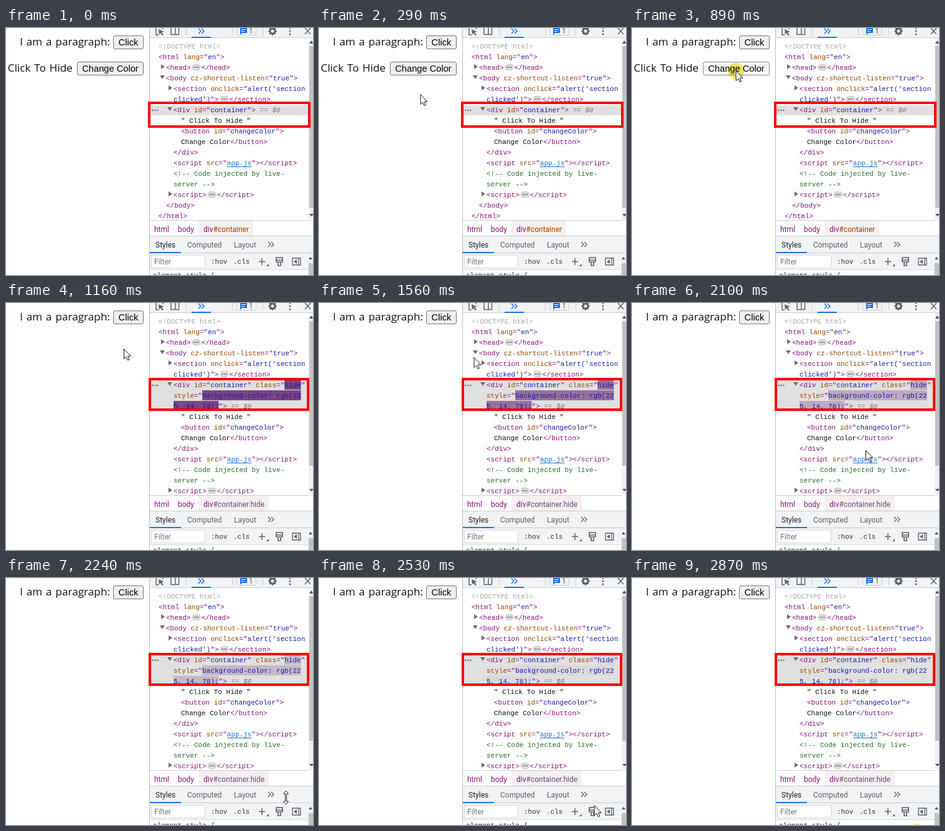
An HTML page with a canvas that plays this animation: 493 px wide and 396 px high, repeating every 2940 ms.

```html
<!DOCTYPE html>
<html lang="en">
<head>
<meta charset="utf-8">
<title>Hide and recolor demo</title>
<style>
  html, body { margin: 0; width: 100%; height: 100%; overflow: hidden; background: #fff; }
  canvas { display: block; width: 493px; height: 396px; }
</style>
</head>
<body>
<canvas id="stage"></canvas>
<script>
const W = 493, H = 396, LOOP = 2940, HIDE_AT = 1030, FADE_END = 2600;
const canvas = document.getElementById('stage');
const ratio = window.devicePixelRatio || 1;
canvas.width = W * ratio;
canvas.height = H * ratio;
const ctx = canvas.getContext('2d');
ctx.scale(ratio, ratio);

const MONO = '11px "Liberation Mono", monospace';
const UI = '12px Roboto, sans-serif';
const PAGE = '17.2px "Open Sans", sans-serif';
const BUTTON = '14.67px "Liberation Sans", Arial, sans-serif';
const ICON = '#5f6368', BLUE = '#1a73e8';

// Each piece of a line starts with a style key:
// t tag, n attribute, v value, h changed value, u link, x text, c comment, d doctype, i hint, b fold badge
const INK = { t: '#881280', n: '#994500', v: '#1a1aa6', h: '#1a1aa6', u: '#1a6fc4',
  x: '#111', c: '#236e25', d: '#a8a8a8', i: '#777' };

const HEAD_LINES = [
  [245, 'd<!DOCTYPE html>'],
  [245, 't<html |nlang|t="|ven|t">'],
  [257, 't<head>|b|t</head>', 'right'],
  [257, 't<body |ncz-shortcut-listen|t="|vtrue|t">', 'down'],
  [269, "t<section |nonclick|t=\"|valert('section", 'right'],
  [269, "vclicked')|t\">|b|t</section>"]
];
const DIV_BEFORE = [[269, 't<div |nid|t="|vcontainer|t">|i == $0', 'down']];
const DIV_AFTER = [
  [269, 't<div |nid|t="|vcontainer|t" |nclass|t="|hhide|t"', 'down'],
  [269, 'nstyle|t="|hbackground-color: rgb(22'],
  [269, 'h5, 14, 78);|t">|i == $0']
];
const TAIL_LINES = [
  [281, 'x" Click To Hide "'],
  [281, 't<button |nid|t="|vchangeColor|t">'],
  [281, 'xChange Color|t</button>'],
  [269, 't</div>'],
  [269, 't<script |nsrc|t="|uapp.js|t"><\/script>'],
  [269, 'c<!-- Code injected by live-'],
  [269, 'cserver -->'],
  [269, 't<script>|b|t<\/script>', 'right'],
  [257, 't</body>'],
  [245, 't</html>']
];

// Pointer keys: time, x, y of the tip
const POINTER = [
  [70, -6, 318], [140, 50, 255], [210, 112, 172], [290, 163, 106], [360, 163, 106],
  [560, 167, 68], [1030, 167, 68], [1490, 246, 86], [1560, 249, 87], [1630, 249, 87],
  [1830, 333, 173], [1900, 333, 173], [2030, 348, 182], [2100, 375, 235],
  [2240, 449, 352], [2310, 449, 352], [2600, 440, 368], [2670, 455, 400]
];

function rect(x, y, w, h, color) {
  ctx.fillStyle = color;
  ctx.fillRect(x, y, w, h);
}

function box(x, y, w, h, radius, fill, stroke) {
  ctx.beginPath();
  ctx.roundRect(x + .5, y + .5, w - 1, h - 1, radius);
  if (fill) { ctx.fillStyle = fill; ctx.fill(); }
  if (stroke) { ctx.strokeStyle = stroke; ctx.lineWidth = 1; ctx.stroke(); }
}

function disc(x, y, r, color) {
  ctx.fillStyle = color;
  ctx.beginPath();
  ctx.arc(x, y, r, 0, 7);
  ctx.fill();
}

function text(str, x, y, font, color, align = 'left') {
  ctx.font = font;
  ctx.fillStyle = color;
  ctx.textAlign = align;
  ctx.fillText(str, x, y);
}

function poly(points, fill, x = 0, y = 0, stroke) {
  ctx.beginPath();
  points.forEach(([px, py]) => ctx.lineTo(x + px, y + py));
  ctx.closePath();
  ctx.fillStyle = fill;
  ctx.fill();
  if (stroke) { ctx.strokeStyle = stroke; ctx.lineWidth = 1; ctx.stroke(); }
}

function strokePath(d, color = ICON, width = 1.5) {
  ctx.strokeStyle = color;
  ctx.lineWidth = width;
  ctx.stroke(new Path2D(d));
}

function codeLine([x, pieces, arrow], y, highlight) {
  if (arrow === 'down') poly([[-10, -8], [-2, -8], [-6, -2]], '#6e6e6e', x, y);
  if (arrow === 'right') poly([[-8, -9], [-2, -5], [-8, -1]], '#6e6e6e', x, y);
  for (const piece of pieces.split('|')) {
    const key = piece[0], str = piece.slice(1);
    if (key === 'b') {
      box(x + 2, y - 9, 14, 10, 4, '#dcdcdc', '#c8c8c8');
      for (let i = 0; i < 3; i++) disc(x + 6 + i * 3, y - 4, .9, '#555');
      x += 17;
      continue;
    }
    const font = key === 'i' ? 'italic ' + MONO : MONO;
    ctx.font = font;
    const width = ctx.measureText(str).width;
    if (key === 'h') rect(x, y - 12, width, 16, `rgba(95,25,105,${highlight})`);
    text(str, x, y, font, INK[key]);
    if (key === 'u') rect(x, y + 2, width, 1, INK.u);
    x += width;
  }
}

function button(label, x, y, w, pressed) {
  box(x, y, w, 22, 2.5, pressed ? '#f5f5f5' : '#efefef', pressed ? '#8d8d8d' : '#767676');
  text(label, x + w / 2, y + 16, BUTTON, '#000', 'center');
}

function page(t, hidden) {
  rect(0, 0, W, H, '#fff');
  ctx.wordSpacing = '1.3px';
  text('I am a paragraph:', 167, 28, PAGE, '#111', 'right');
  if (!hidden) text('Click To Hide', 107, 70, PAGE, '#111', 'right');
  ctx.wordSpacing = '0px';
  button('Click', 172, 12, 49);
  if (!hidden) button('Change Color', 114, 54, 107, t >= 890);
}

function toolbar() {
  rect(231, 0, 262, 15, '#f1f3f4');
  rect(231, 15, 262, 1, '#cacdd1');
  strokePath('M241 0V11H245M252 0V2');
  poly([[245, 2], [254, 6], [250, 7], [253, 11], [251, 12], [248, 8], [246, 11]], ICON);
  strokePath('M265 0V10.5H277.5V0M272 0V10');
  rect(289, 0, 1, 12, '#cacdd1');
  strokePath('M309 1L313 5L309 9M314 1L318 5L314 9', BLUE);
  rect(298, 14, 31, 2, BLUE);
  rect(363, 0, 1, 12, '#cacdd1');
  box(370, -4, 32, 16, 2, '#f1f3f4', '#cacdd1');
  poly([[376, 0], [387, 0], [387, 8], [379, 8], [376, 11]], BLUE);
  rect(378, 2, 7, 1, '#fff');
  rect(378, 5, 5, 1, '#fff');
  text('1', 390, 9, UI, ICON);
  rect(412, 0, 1, 12, '#cacdd1');
  ctx.strokeStyle = ICON;
  ctx.lineWidth = 3;
  ctx.beginPath();
  ctx.arc(428, 5, 4, 0, 7);
  ctx.stroke();
  for (let i = 0; i < 8; i++) {
    const a = i * Math.PI / 4;
    disc(428 + 5.6 * Math.cos(a), 5 + 5.6 * Math.sin(a), 1.3, ICON);
  }
  for (const y of [0, 5, 10]) disc(456, y, 1.5, ICON);
  strokePath('M480 0L489 10M489 0L480 10');
}

function elements(hidden, highlight) {
  const lines = [...HEAD_LINES, ...(hidden ? DIV_AFTER : DIV_BEFORE), ...TAIL_LINES];
  ctx.save();
  ctx.beginPath();
  ctx.rect(231, 16, 262, 293);
  ctx.clip();
  rect(231, 124, 255, hidden ? 50 : 16, '#e0e0e0');
  lines.forEach((line, i) => codeLine(line, Math.round(32.6 + i * 17.05), highlight));
  for (let i = 0; i < 3; i++) disc(235.5 + i * 4, 132, 1.2, '#666');
  rect(486, 16, 7, 293, '#f1f1f1');
  rect(487, 29, 6, hidden ? 232 : 259, '#c1c1c1');
  poly([[487, 25], [493, 25], [490.5, 20]], '#505050');
  poly([[487, 298], [494, 298], [490.5, 302]], '#505050');
  ctx.restore();

  ctx.strokeStyle = '#f00';
  ctx.lineWidth = 4;
  if (hidden) ctx.strokeRect(231, 122, 254, 49);
  else ctx.strokeRect(230, 120, 257, 38);
}

function stylesPane(hidden) {
  rect(231, 308, 262, 1, '#cacdd1');
  rect(309, 309, hidden ? 113 : 88, 24, '#f5f0ef');
  text('html', 238, 327, UI, INK.t);
  text('body', 276, 327, UI, INK.t);
  text('div', 317, 327, UI, INK.t);
  const divWidth = ctx.measureText('div').width;
  text(hidden ? '#container.hide' : '#container', 317 + divWidth, 327, UI, hidden ? '#6e4a7a' : INK.n);

  rect(231, 333, 262, 28, '#f1f3f4');
  rect(231, 333, 262, 1, '#cacdd1');
  rect(231, 360, 262, 1, '#cacdd1');
  rect(231, 359, 50, 2, BLUE);
  text('Styles', 240, 352, UI, '#222');
  text('Computed', 291, 352, UI, ICON);
  text('Layout', 366, 352, UI, ICON);
  strokePath('M421 343L425 347L421 351M426 343L430 347L426 351', ICON, 1.3);

  rect(231, 361, 262, 26, '#f1f3f4');
  box(233, 364, 87, 21, 0, '#fff', '#d8dadd');
  text('Filter', 238, 379, UI, '#757575');
  text(':hov', 329, 378, MONO, '#333');
  text('.cls', 365, 378, MONO, '#333');
  strokePath('M406 374.5H416M411 369V380', ICON, 1.5);
  poly([[418, 382], [422, 382], [422, 378]], ICON);
  strokePath('M434 368H444V375H434ZM434 372H444M437 376V381H441V376', ICON, 1.7);
  strokePath('M460 369H473V380H460ZM470 369V380', ICON, 1.3);
  poly([[467, 371], [467, 378], [462, 374.5]], ICON);
  rect(231, 387, 262, 9, '#fff');
  rect(231, 387, 255, 1, '#d8dadd');
  text('element.style {', 236, 400, MONO, '#333');
  rect(485, 361, 8, 35, '#f1f1f1');
  poly([[486, 371], [492, 371], [489, 367]], '#505050');
  rect(486, 377, 7, 19, '#c1c1c1');
}

function pointerAt(t) {
  const i = POINTER.findIndex(key => key[0] > t);
  if (i < 1) return null;
  const [t0, x0, y0] = POINTER[i - 1], [t1, x1, y1] = POINTER[i];
  const k = (t - t0) / (t1 - t0);
  return [x0 + (x1 - x0) * k, y0 + (y1 - y0) * k];
}

function clickGlow(x, y) {
  ctx.globalCompositeOperation = 'multiply';
  disc(x, y, 13, 'rgba(244,228,20,.65)');
  ctx.globalCompositeOperation = 'source-over';
}

function drawPointer(t) {
  if (t >= 890 && t < HIDE_AT) clickGlow(167, 69);
  if (t >= 2870) clickGlow(457, 407);
  const at = pointerAt(t);
  if (!at) return;
  const [x, y] = at;
  if (t >= 2200 && t < 2380) {
    poly([[0, -11], [4, -6], [1, -6], [1, 6], [4, 6], [0, 11], [-4, 6], [-1, 6], [-1, -6], [-4, -6]],
      '#fff', x + .5, y, '#222');
  } else {
    poly([[0, 0], [0, 16], [3.7, 12.6], [6, 18], [8.5, 17], [6.2, 11.6], [11, 11.6]],
      '#fff', x, y + .5, '#111');
  }
}

function draw(t) {
  const hidden = t >= HIDE_AT;
  const highlight = Math.max(0, .85 * (FADE_END - t) / (FADE_END - HIDE_AT));
  page(t, hidden);
  rect(230, 0, 1, H, '#b8bbbf');
  toolbar();
  stylesPane(hidden);
  elements(hidden, highlight);
  drawPointer(t);
}

const start = performance.now();
function tick() {
  draw((performance.now() - start) % LOOP);
  requestAnimationFrame(tick);
}
tick();
</script>
</body>
</html>
```
